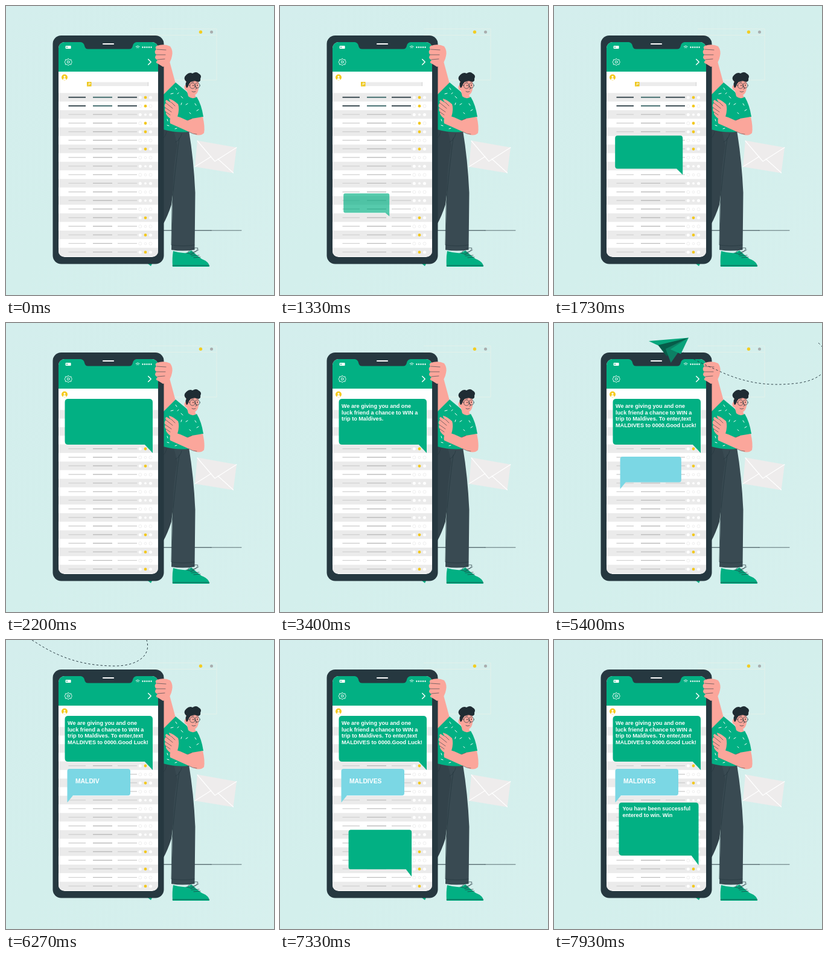
An HTML page that plays this animation: 444x480 px, repeating every 8000 ms.

```html
<!DOCTYPE html>
<html lang="en">
<head>
<meta charset="utf-8">
<title>Text to win</title>
<style>
html, body { margin: 0; width: 100%; height: 100%; overflow: hidden; background: #d5efed; }
svg { display: block; width: 100vw; height: 100vh; }
text { font-family: "Liberation Sans", Arial, sans-serif; font-weight: bold; fill: #fff; white-space: pre; }
.line { fill: none; stroke: #263840; stroke-linecap: round; stroke-linejoin: round; }
.white { fill: none; stroke: #fff; stroke-linecap: round; stroke-linejoin: round; }
.skin { fill: #fba69b; }
.green { fill: #02b083; }
</style>
</head>
<body>
<svg viewBox="0 0 444 480" preserveAspectRatio="none">
  <defs>
    <linearGradient id="sky" x1="0" y1="0" x2="1" y2="1">
      <stop offset="0" stop-color="#d4eeed"/><stop offset=".5" stop-color="#d3efec"/><stop offset="1" stop-color="#d7f0ee"/>
    </linearGradient>
    <clipPath id="screen"><rect x="87" y="60" width="165" height="357" rx="10"/></clipPath>
  </defs>
  <rect width="444" height="480" fill="url(#sky)"/>

  <g id="window">
    <path d="M238 38H349V123H262M238 48.5H349" fill="none" stroke="#e3f1ea"/>
    <circle cx="322.5" cy="43.3" r="2.7" fill="#f3cd22"/>
    <circle cx="340.5" cy="43.3" r="2.5" fill="#a9adae"/>
  </g>

  <g id="envelope">
    <path d="M317 223.5L382 235L376.5 277.5L313 267Z" fill="#eeecec"/>
    <path class="white" d="M317 224L346 258L382 235M313 267L340 250M376.5 277L351 254" stroke-width="1.2"/>
  </g>

  <path class="line" d="M261 372.8H340"/>
  <path class="line" d="M340 372.8H390" stroke-width=".7"/>

  <g id="person" stroke-width=".7">
    <g stroke="none">
      <path d="M260 204L290 208L284 250L274 330Q268 349 260 363Z" fill="#33434b"/>
      <path d="M278 207L303 207Q311 255 313.500 310L312.500 405Q292 408 274 405L276 320Q277 262 284 232Z" fill="#394a52"/>
    </g>
    <path class="line" d="M287 219Q279 280 275 332L274 397Q294 400 312 397M291 212Q289 222 281 226M266 209Q264 217 261 219"/>
    <path class="green" d="M277 407Q289 411 300 410L307 406Q316 414 324 420Q337 425 337 433L276 433Q275 418 277 407Z"/>
    <path class="line" d="M276 431H337M299 410Q306 413 313 412M301 409Q310 400 318 402Q317 409 306 409M306 413L319 405M307 415L320 414M311 418L322 417"/>
    <path class="green" d="M235 428H242L240 432Z"/>

    <path class="skin" d="M259 90L271 92L281 129L264 148L260 148Z"/>
    <path class="green" d="M260 148L281 127L299 142Q308 155 316 151Q324 164 327 184L307 189L302 209Q282 211 260 205Z"/>
    <path class="white" d="M281 136l2 3M273 146l4 -1M290 150l3 3M286 144l-2 2M298 164l3 -2M313 162l2 3M316 174l3 -2M304 177l2 2M267 188l1 3M280 204l3 -1M291 161l-1 3M267 198l3 1" stroke-width="1"/>
    <path class="skin" d="M299 138L302 150Q309 156 315 151L311 145Z"/>
    <path class="skin" d="M298 125Q309 116 319 126Q321 143 313 148Q306 149 301 141Q295 140 295.500 134Q296 130 299 132Z"/>
    <path d="M299 136Q296 129 299 126Q292 120 299 114Q304 109 309 112Q315 108 319 112Q325 115 322 121Q323 125 319 126Q312 123 306 126Q302 130 301 135Z" fill="#1f2c33"/>
    <g class="line">
      <circle cx="309" cy="132.5" r="4.6"/><circle cx="317" cy="132" r="4.2"/>
      <path d="M300 131L305 132M313 132Q315 134 316 137L314 138M308 142Q311 144 314 142M307 126L311 126M315 125L318 126"/>
    </g>
    <circle cx="310" cy="132" r=".8"/><circle cx="317" cy="131.500" r=".8"/>
    <path class="skin" d="M308 187L326 184Q330 201 328 211Q322 217 312 213L272 195Q270 187 276 181Q288 184 300 190Z"/>
    <path class="line" d="M303 209Q309 213 316 213M308 187L301 190" stroke-width=".5"/>
  </g>

  <g id="phone">
    <rect x="77.500" y="49" width="184" height="379.500" rx="14" fill="#263840"/>
    <g clip-path="url(#screen)">
      <rect x="87" y="60" width="165" height="357" fill="#fff"/>
      <g id="rows"></g>
      <rect class="green" x="87" y="60" width="165" height="49"/>
      <path d="M124 60H216Q211 61 210 66Q209 71.500 204 71.500H136Q131 71.500 130 66Q129 61 124 60Z" fill="#263840"/>
    </g>
    <path d="M161 63H178" class="white" stroke-width="2.200"/>
    <rect x="98.600" y="66" width="9" height="5" rx="1" fill="#fff"/>
    <path d="M101 67.500V69.500" stroke="#02b083" stroke-width="1.500"/>
    <path class="white" d="M215.200 67.500Q218.200 64.800 221.200 67.500M216.600 69.200Q218.200 67.800 219.800 69.200" stroke-width=".9"/>
    <path d="M226.500 68.500H242" stroke="#fff" stroke-width="2.400" stroke-linecap="round" stroke-dasharray="0 3.500"/>
    <path class="white" d="M103.200 87.500l2 1.700 2.700-.2.300 2.600 1.300 1.500-1.300 1.500-.3 2.600-2.700-.2-2 1.700-2-1.700-2.700.2-.3-2.600-1.300-1.500 1.300-1.500.3-2.600 2.700.2Z" stroke-width=".9"/>
    <circle class="white" cx="103.200" cy="93" r="1.900" stroke-width=".9"/>
    <path class="white" d="M235.700 88.500L240.200 93L235.700 97.500" stroke-width="1.500"/>
    <circle cx="97" cy="118.500" r="5" fill="#f5ca1e"/>
    <path d="M94.500 123Q94.500 119.500 97 119.500T99.500 123Z" fill="#fff"/><circle cx="97" cy="117.500" r="1.500" fill="#fff"/>
    <rect x="141" y="126.500" width="95" height="6.500" fill="#ececec"/>
    <path d="M235.500 126.500V133" stroke="#d2d2d2"/>
    <rect x="134" y="126" width="7.500" height="7.500" fill="#eec81e"/>
    <path class="white" d="M136 131.500L137.500 130" stroke-width=".8"/><circle class="white" cx="138.300" cy="129" r="1.300" stroke-width=".8"/>
  </g>

  <g id="hands" stroke-width=".6">
    <path class="skin" d="M250 66Q262 62 272 67Q277 74 275 83Q273 94 266 99L260 101L252 96Q246 94 251 90Q244 86 249 81Q244 76 249 72Q246 68 250 66Z"/>
    <path class="line" d="M250 72L265 73M249 81L264 81M251 89L263 88"/>
    <path class="skin" d="M270 154Q276 155 285 163Q288 171 284 184L272 187Q264 181 265 176Q262 173 264 169Q261 165 265 161Q263 157 266 156L274 161Q270 157 270 154Z"/>
    <path class="line" d="M265 161L276 170M264 169L274 176M265 176L272 181M274 160L280 166"/>
  </g>

  <g id="plane">
    <path d="M381 111C398 122 420 128 440 135C490 153 530 153 575 143C612 134 630 112 616 89Q610 78 600 72" fill="none" stroke="#263840" stroke-width=".9" stroke-dasharray="3.500 3.300"/>
    <path d="M322 98L387 86L351 108Z" fill="#08a77d"/>
    <path d="M338 103L387 86L362 112L354 120Z" fill="#075c49"/>
    <path d="M351 108L387 86L362 130Z" fill="#0c8064"/>
    <path d="M359 108L387 86L377 114Z" fill="#0aa27a"/>
  </g>

  <g id="bubbles"></g>
</svg>

<script>
const NS = "http://www.w3.org/2000/svg";
const LOOP = 8000, STEP = 1000 / 15;
const $ = id => document.getElementById(id);
const clamp01 = v => Math.min(1, Math.max(0, v));
const easeOut = p => p * (1.3 - .3 * p);

function add(parent, tag, attrs) {
  const el = document.createElementNS(NS, tag);
  for (const key in attrs) el.setAttribute(key, attrs[key]);
  return parent.appendChild(el);
}

function drawRows() {
  const starred = [0, 1, 3, 4, 6, 14, 16, 18];
  const columns = [[103.5, 132], [144, 176], [185, 217]];
  for (let i = 0; i < 19; i++) {
    const y = 151.6 + i * 14.28, striped = i % 2 === 0, bold = i < 2;
    if (striped) add($("rows"), "rect", { x: 87, y: y - 7.1, width: 165, height: 14.2, fill: "#ebebeb" });
    columns.forEach(([x1, x2], c) => add($("rows"), "path", {
      d: `M${x1} ${y}H${x2}`,
      stroke: bold ? (c === 1 ? "#315f60" : "#263840") : (c === 1 ? "#bdbdbd" : "#d2d2d2"),
      "stroke-width": bold ? 1.6 : 1.4
    }));
    [222.3, 231, 239.5].forEach((x, c) => {
      const star = c === 1 && starred.includes(i);
      add($("rows"), "circle", {
        cx: x, cy: y + .3, r: star ? 2.4 : c === 1 ? 1.9 : 2.5,
        fill: star ? "#f2c81f" : "#fff",
        stroke: striped || star ? "none" : "#e2e2e2", "stroke-width": .6
      });
    });
  }
}

function bubblePath([left, top, right, bottom], tailLeft) {
  const w = right - left, h = bottom - top, r = Math.min(w * .038, h * .1);
  const base = top + h * (tailLeft ? .79 : .845);
  const X = x => tailLeft ? right - x : left + x;
  return `M${X(r)} ${top}H${X(w - r)}Q${X(w)} ${top} ${X(w)} ${top + r}V${bottom}` +
    `L${X(w * .91)} ${base}H${X(r)}Q${X(0)} ${base} ${X(0)} ${base - r}V${top + r}Q${X(0)} ${top} ${X(r)} ${top}Z`;
}

// Boxes are left, top, right, bottom; fade is how fast opacity outruns the motion.
const messages = [
  {
    fill: "#02b083", begin: 930, end: 2200, fade: 2.1,
    from: [110, 426, 143, 432], to: [97.5, 126, 243, 216],
    x: 102, y: 141, size: 9.1, typeAt: 2333, perChar: 14.6,
    lines: ["We are giving you and one", "luck friend a chance to WIN a",
            "trip to Maldives. To enter,text", "MALDIVES to 0000.Good Luck!"]
  },
  {
    fill: "#7bd7e4", begin: 4200, end: 5470, fade: 1.35, tailLeft: true,
    from: [307, 416, 329, 417], to: [101.5, 214, 206, 270],
    x: 115, y: 238, size: 10.35, typeAt: 5600, perChar: 104,
    lines: ["MALDIVES"]
  },
  {
    fill: "#02b083", begin: 6670, end: 7670, fade: 2.1,
    from: [130, 438, 160, 444], to: [107.5, 270, 239.5, 374],
    x: 113.5, y: 283, size: 9.05, typeAt: 7640, perChar: 6.6,
    lines: ["You have been successful", "entered to win. Win"]
  }
];

for (const m of messages) {
  m.shape = add($("bubbles"), "path", { fill: m.fill });
  m.rows = m.lines.map((_, i) => add($("bubbles"), "text", {
    x: m.x, y: m.y + i * 10.6, "font-size": m.size
  }));
}

function renderMessage(m, t) {
  const p = clamp01((t - m.begin) / (m.end - m.begin)), k = easeOut(p);
  const box = m.from.map((v, i) => v + (m.to[i] - v) * k);
  m.shape.setAttribute("d", bubblePath(box, m.tailLeft));
  m.shape.setAttribute("opacity", clamp01(p * m.fade));
  let typed = Math.floor((t - m.typeAt) / m.perChar);
  m.lines.forEach((line, i) => {
    m.rows[i].textContent = line.slice(0, Math.max(0, typed));
    typed -= line.length + 1;
  });
}

// The plane crosses at steady speed, slowly pitching its nose up.
function renderPlane(t) {
  const k = (t - 4730) / 1540;
  $("plane").setAttribute("transform", `translate(${-382 * k} ${-143 * k}) rotate(${13 * k} 380 107)`);
  $("plane").setAttribute("visibility", t >= 4200 && t < 7400 ? "visible" : "hidden");
}

function tick() {
  const now = performance.now() % LOOP;
  const t = Math.floor((now + 4) / STEP) * STEP;
  messages.forEach(m => renderMessage(m, t));
  renderPlane(t);
  requestAnimationFrame(tick);
}

drawRows();
tick();
</script>
</body>
</html>
```
